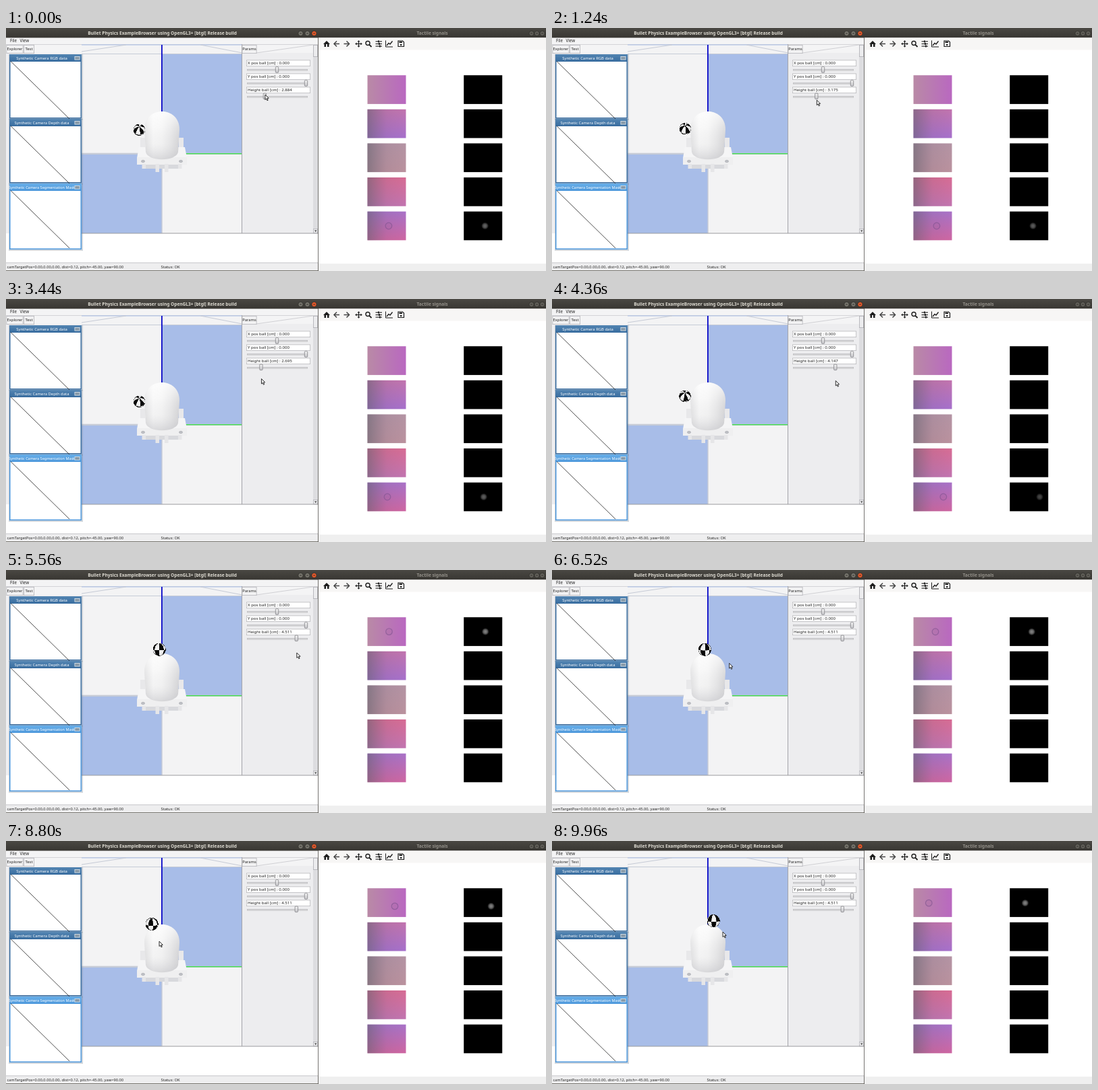
Write an HTML page with a canvas that moves like this. It is 800 px wide and 361 px high and loops after 10 s.

```html
<!DOCTYPE html>
<html lang="en">
<head>
<meta charset="utf-8">
<title>Tactile simulation</title>
<style>
html, body { margin: 0; width: 100%; height: 100%; overflow: hidden; background: #fff; }
canvas { display: block; width: 800px; height: 361px; }
</style>
</head>
<body>
<canvas id="stage" width="800" height="361"></canvas>
<script>
const W = 800, H = 361, LOOP = 10000, STEP = 40;
const SPLIT = 463, AXIS = 231;
const FONT = '"Noto Sans", "Open Sans", sans-serif';
const RGB_X = 535.5, DEPTH_X = 678.2, TILE_W = 57, TILE_H = 42.7;
const rowY = i => 70.2 + i * 50.6;
const stage = document.getElementById('stage').getContext('2d');
let c = stage;

function layer(w, h) {
  const canvas = document.createElement('canvas');
  canvas.width = w;
  canvas.height = h;
  return canvas;
}
function rect(x, y, w, h, fill) {
  c.fillStyle = fill;
  c.fillRect(x, y, w, h);
}
function frame(x, y, w, h, fill, edge) {
  rect(x, y, w, h, edge);
  rect(x + 0.8, y + 0.8, w - 1.6, h - 1.6, fill);
}
function paint(fill, edge, width = 1) {
  if (fill) { c.fillStyle = fill; c.fill(); }
  if (edge) { c.strokeStyle = edge; c.lineWidth = width; c.stroke(); }
}
function poly(points, fill, edge, width) {
  c.beginPath();
  points.forEach(p => c.lineTo(...p));
  c.closePath();
  paint(fill, edge, width);
}
function line(points, edge, width) {
  c.beginPath();
  points.forEach(p => c.lineTo(...p));
  paint(null, edge, width);
}
function oval(x, y, rx, ry, fill, edge, width) {
  c.beginPath();
  c.ellipse(x, y, rx, ry, 0, 0, 7);
  paint(fill, edge, width);
}
const disc = (x, y, r, ...style) => oval(x, y, r, r, ...style);

function text(str, x, y, size, fill = '#222', align = 'left', weight = 400) {
  c.font = `${weight} ${size}px ${FONT}`;
  c.textAlign = align;
  c.fillStyle = fill;
  c.fillText(str, x, y);
}
function spread(g, colors) {
  colors.forEach((color, i) => g.addColorStop(i / (colors.length - 1), color));
  return g;
}
const across = (x, w, ...colors) => spread(c.createLinearGradient(x, 0, x + w, 0), colors);
const down = (y, h, ...colors) => spread(c.createLinearGradient(0, y, 0, y + h), colors);

// --- static scene ---

function titleBar(x, w, label, ink, button, gap, active) {
  rect(x, 0, w, 14.5, down(0, 14, '#4a4843', '#393733'));
  text(label, x + w / 2, 9.7, 6.55, ink, 'center', 700);
  for (let i = 0; i < 3; i++) {
    const close = active && i === 2;
    disc(button + i * gap, 8, 3.6, close ? '#e8592b' : active ? '#77756d' : '#615f59', '#2c2b28', 0.7);
    rect(button + i * gap - 1.4, 7.5, 2.8, 1, '#35332f');
  }
}

function floor() {
  const blue = '#a8bde8', white = '#f3f3f4', gap = '#c6cbd6';
  rect(112, 25, 238, 280, gap);
  rect(112, 25, 238, 13, white);
  rect(112, 24.5, 238, 1, blue);
  line([[112, 35], [178, 25]], gap);
  line([[288, 25], [350, 37]], gap);
  for (let i = 0; i < 4; i++) {
    const right = i % 2, low = i > 1;
    rect(right ? 231.7 : 112, low ? 188 : 39, 118.3, low ? 117 : 146.7, right ^ low ? blue : white);
  }
  rect(230, 25, 1.8, 102, '#0808c8');
  rect(266, 186, 84, 1.4, '#45e04e');
}

function sensor() {
  const pair = (dx, y, w, h, fill) => {
    rect(AXIS + dx, y, w, h, fill);
    rect(AXIS - dx - w, y, w, h, fill);
  };
  pair(25, 163, 7, 20, '#e8e8ea');
  pair(0, 203, 29, 6, '#d8d9dd');
  poly([[197, 177], [265, 177], [268, 193], [194, 193]], '#f5f5f6');
  pair(0, 192, 37, 11, '#efeff0');
  for (const dx of [4, 24]) pair(dx, 202, 5.5, dx < 10 ? 12 : 7, '#e6e6e8');
  for (const side of [-28, 28]) oval(AXIS + side, 198, 2.6, 1.7, '#bfc1c6', '#a5a7ad', 0.6);
  c.beginPath();
  c.moveTo(205, 151);
  c.bezierCurveTo(205, 115, 257, 115, 257, 151);
  c.lineTo(255, 184);
  c.bezierCurveTo(252, 199, 210, 199, 207, 184);
  c.closePath();
  paint(across(205, 52, '#e0e0e1', '#f7f7f7', '#f4f4f4', '#e6e6e7', '#d2d2d4'));
  paint(down(123, 73, '#ffffffc0', '#ffffff40', '#d8d8da20', '#bebec390'));
}

function cameraWindow(index, label) {
  const y = 39 + index * 96, active = index === 2, h = active ? 98 : 95.5;
  const [light, dark] = active ? ['#68afe9', '#4c97db'] : ['#5385b2', '#386c9f'];
  rect(4, y, 110, h + 2, '#6d7f9250');
  rect(5, y, 107, h, dark);
  rect(5, y, 107, 11, down(y, 11, light, dark));
  rect(6.5, y + 11, 104, h - 12.5, '#fff');
  line([[7, y + 10.5], [94, y + 96]], '#222', 0.8);
  text(label, 53, y + 7.6, active ? 5.5 : 5.9, '#fff', 'center');
  frame(101.5, y + 3, 8, 5.5, '#8799a8', '#dce6ee');
}

function paramRow(y, label) {
  frame(356, y, 95, 9.5, '#fff', '#b9b9bc');
  text(label, 358, y + 6.9, 6.1);
  frame(357, y + 13.5, 90, 2.5, '#dededf', '#bdbdc0');
}
function handle(x, y) {
  c.beginPath();
  c.roundRect(x - 2.2, y - 4.3, 4.4, 8.6, 1);
  paint(down(y - 4, 8, '#f4f4f4', '#c5c5c9'), '#77777c', 0.7);
}
function tab(x, w, label) {
  frame(x, 25, w, 13, '#f2f2f3', '#b4b4ba');
  text(label, x + w / 2, 33, 5.8, '#222', 'center');
}

function browserWindow() {
  rect(0, 0, SPLIT, H, '#fff');
  rect(0, 14, SPLIT, 24, '#f4f4f5');
  text('File', 6, 21.3, 6.2);
  text('View', 20.5, 21.3, 6.2);
  rect(0, 24, SPLIT, 0.7, '#c7c7cb');
  rect(0, 37.5, 113, 267.5, '#efeff1');
  tab(0.5, 25, 'Explorer');
  tab(26, 16, 'Test');
  floor();
  sensor();
  rect(349.3, 37, 114, 268, '#ededef');
  rect(349, 24, 1, 281, '#a4a4aa');
  line([[371, 37], [455, 25]], '#d0d0d4');
  tab(349.5, 22, 'Params');
  ['X', 'Y'].forEach((axis, i) => {
    paramRow(47.5 + i * 20, `${axis} pos ball [cm] : 0.000`);
    handle(401.5 + i * 43, 62 + i * 20);
  });
  rect(455, 24.5, 7.5, 280.5, '#dddde0');
  frame(455, 25, 7, 18, '#ececee', '#aeaeb3');
  frame(455, 298, 7, 7, '#ececee', '#b4b4b9');
  poly([[457, 300.5], [460.5, 300.5], [458.7, 303]], '#444');
  rect(112, 304.5, 351, 1, '#9b9ba0');
  rect(0, 348.5, SPLIT, 13, '#eeeeef');
  rect(0, 348.5, SPLIT, 0.8, '#bdbdc0');
  text('camTargetPos=0.00,0.00,0.00, dist=0.12, pitch=-45.00, yaw=90.00', 1.5, 356.8, 5.7);
  text('Status: OK', 229.5, 356.8, 5.8);
  rect(0, 360, SPLIT, 1, '#77756f');
  ['RGB data', 'Depth data', 'Segmentation Mask'].forEach((kind, i) => cameraWindow(i, `Synthetic Camera ${kind}`));
  titleBar(0, SPLIT, 'Bullet Physics ExampleBrowser using OpenGL3+ [btgl] Release build', '#dedbd2', 436.5, 10, true);
  rect(SPLIT - 0.8, 14, 0.8, H, '#55534f');
}

function arrow(x, y, dir, ink) {
  line([[x - dir * 4, y], [x + dir * 3.5, y]], ink, 1.5);
  line([[x, y - 4], [x + dir * 4, y], [x, y + 4]], ink, 1.5);
}
function toolbar() {
  const ink = '#1c1c1c', y = 23.5;
  rect(SPLIT, 14.5, W - SPLIT, 18, '#f7f6f5');
  poly([[470, 24], [475, 19], [480, 24]], ink);
  rect(471.5, 23.5, 2.5, 4.5, ink);
  rect(476, 23.5, 2.5, 4.5, ink);
  arrow(490, y, -1, '#444');
  arrow(504.5, y, 1, '#444');
  for (let i = 0; i < 4; i++) {
    c.save();
    c.translate(522.5, y);
    c.rotate(i * Math.PI / 2);
    line([[0, 0], [0, -4]], ink, 1.2);
    poly([[-2, -3], [0, -5.3], [2, -3]], ink);
    c.restore();
  }
  disc(536, 22.5, 3, null, ink, 1.4);
  line([[538.2, 24.8], [541.5, 28]], ink, 1.8);
  for (let i = -1; i < 2; i++) {
    rect(547.5, y + i * 3.5 - 0.5, 9.5, 1.1, ink);
    rect(552 + i, y + i * 3.5 - 1.5, 1.8, 3, ink);
  }
  line([[562.5, 18.5], [562.5, 28], [573, 28]], ink);
  line([[564, 26], [567, 22.5], [569, 24], [572.5, 19.5]], ink, 1.3);
  poly([[581, 19], [587.5, 19], [589.5, 21], [589.5, 27.5], [581, 27.5]], null, ink, 1.2);
  rect(582.5, 20, 4.5, 2, ink);
  disc(585.2, 25, 1.3, ink);
}

function signalWindow() {
  rect(SPLIT, 0, W - SPLIT, H, '#fff');
  titleBar(SPLIT, W - SPLIT, 'Tactile signals', '#94918a', 778.5, 8, false);
  toolbar();
  rect(SPLIT, 350, W - SPLIT, 11, '#efefef');
  const tints = [['#b98aa6', '#b968c0'], ['#c274ae', '#a670cc'], ['#b494a4', '#bb929e'],
    ['#d86c94', '#c274b0'], ['#a872c8', '#cf66a2']];
  tints.forEach((tint, i) => {
    const y = rowY(i);
    rect(RGB_X, y, TILE_W, TILE_H, i ? down(y, TILE_H, ...tint) : across(RGB_X, TILE_W, ...tint));
    if (i) rect(RGB_X, y, TILE_W, TILE_H, across(RGB_X, TILE_W, '#60606c90', '#70607820', '#70607800'));
    rect(DEPTH_X, y, TILE_W, TILE_H, '#000');
  });
}

const scene = layer(W, H);
c = scene.getContext('2d');
browserWindow();
signalWindow();

// --- motion ---

// Each key is [time, ...values]; values ease between keys.
function at(keys, t) {
  const next = keys.findIndex(k => k[0] > t);
  if (next < 1) return keys.at(next).slice(1);
  const a = keys[next - 1], b = keys[next], u = (t - a[0]) / (b[0] - a[0]), e = u * u * (3 - 2 * u);
  return a.slice(1).map((v, j) => v + (b[j + 1] - v) * e);
}

const SIDE_END = 4700, DRAG_END = 5700;
const HEIGHT = [[0, 2.884], [1500, 3.2], [2480, 2.158], [4100, 3], [4360, 4.147], [SIDE_END, 4.511]];
const BALL_X = [[SIDE_END, 197], [5240, 218], [5560, 227], [6300, 227], [7480, 220], [8800, 216], [9700, 239]];
const POINTER = [[DRAG_END, 430, 123], [6700, 247, 140], [7480, 247, 142], [8800, 227, 149], [9960, 253, 135]];

const BALL_PX = 60;
const ballLayer = layer(BALL_PX, BALL_PX);
const ballCtx = ballLayer.getContext('2d');
const ballPixels = ballCtx.createImageData(BALL_PX, BALL_PX);

// Checkered sphere: eight meridian sectors, alternating across the equator.
function drawBall(x, y, r, spin, tilt) {
  const n = BALL_PX, data = ballPixels.data;
  for (let j = 0; j < n; j++) for (let i = 0; i < n; i++) {
    const u = (i + 0.5) * 2 / n - 1, v = (j + 0.5) * 2 / n - 1, d = u * u + v * v, o = (j * n + i) * 4;
    data[o + 3] = d < 1 ? 255 : 0;
    if (d >= 1) continue;
    const w = Math.sqrt(1 - d);
    const height = v * Math.cos(tilt) - w * Math.sin(tilt), depth = v * Math.sin(tilt) + w * Math.cos(tilt);
    const sector = Math.floor((Math.atan2(u, depth) + spin) / (Math.PI / 4));
    const dark = (sector + (height < 0)) & 1;
    data[o] = data[o + 1] = data[o + 2] = dark || d > 0.93 ? 8 : 250 - 35 * d;
  }
  ballCtx.putImageData(ballPixels, 0, 0);
  c.drawImage(ballLayer, x - r, y - r, r * 2, r * 2);
}

function drawBump(x, y, glow) {
  disc(x, y, 4.8, '#96609c28', '#78508c90', 1.2);
  const dx = x + DEPTH_X - RGB_X, g = c.createRadialGradient(dx, y, 0, dx, y, 5.5);
  const grey = k => `rgb(${glow * k},${glow * k},${glow * k})`;
  disc(dx, y, 5.5, spread(g, [grey(1), grey(0.75), '#000']));
}

function drawPointer(x, y) {
  poly([[0, 0], [0, 7.5], [1.8, 6], [3, 8.8], [4.3, 8.2], [3, 5.5], [5.3, 5.3]]
    .map(([dx, dy]) => [x + dx, y + dy]), '#f4f4f4', '#1c1c1c', 0.9);
}

function draw(t) {
  c = stage;
  c.drawImage(scene, 0, 0);
  const [height] = at(HEIGHT, t), lift = height - 2.158, knob = 362.5 + 28.8 * lift;
  paramRow(87.5, `Height ball [cm] : ${height.toFixed(3)}`);
  handle(knob, 101.3);

  if (t < SIDE_END) {
    drawBall(197.7 - lift * 0.35, 155.3 - lift * 5.5, 8.7, 1.2 + lift * 0.3, 1);
    drawBump(559.5 + lift * 10.2, 294, 105 - 32 * Math.min(1, Math.abs(lift - 0.75)));
  } else {
    // The ball rolls over the crown of the dome.
    const [x] = at(BALL_X, t), y = 117.5 + 0.023 * (x - AXIS - 1) ** 2, onTop = x > 205;
    drawBall(x, y, 9.5, (x - 227) * 0.09, 0.12 + (y - 118) * 0.03);
    if (onTop) drawBump(567.5 - (x - 227) * 0.77, y - 26.5, 135);
    else drawBump(583.5, 294, 60);
  }

  if (t < DRAG_END) drawPointer(knob + 0.5, 99 + 24 * Math.sin(Math.PI / 2 * t / DRAG_END));
  else drawPointer(...at(POINTER, t));
}

const start = performance.now();
function tick() {
  const t = Math.max(0, performance.now() - start) % LOOP;
  draw(Math.floor(t / STEP) * STEP);
  requestAnimationFrame(tick);
}
tick();
</script>
</body>
</html>
```
